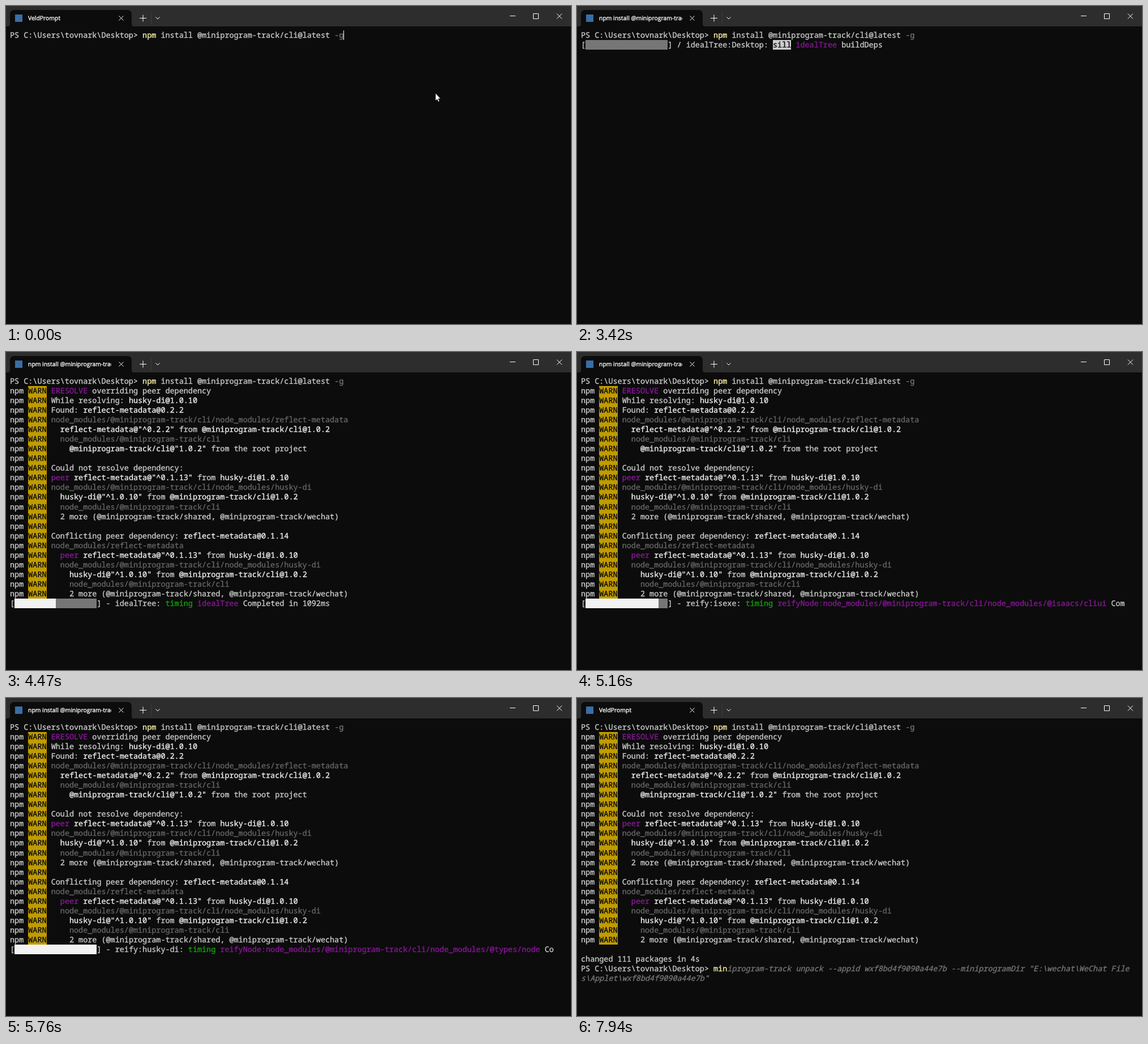
Recreate the animation shown at these times as an HTML page. Size 998 by 561 pixels, loop 7.99 s.

```html
<!DOCTYPE html>
<html lang="en">
<head>
<meta charset="utf-8">
<title>Terminal</title>
<style>
html, body { margin: 0; width: 100%; height: 100%; overflow: hidden; background: #0c0c0c; }
svg, #title, .row, #caret { position: absolute; }
svg { left: 0; top: 0; }
#title, .row { white-space: pre; text-rendering: geometricPrecision; -webkit-text-stroke: .35px; }
#title {
  left: 39px; top: 14px; width: 147px; overflow: hidden; color: #fff;
  font: 500 10.4px/16px "Open Sans", sans-serif;
}
.row {
  left: 7px; color: #ccc;
  font: 500 13.46px/16px "Noto Sans Mono", monospace;
  font-variant-ligatures: none;
}
#caret { width: 1px; height: 17px; background: #fff; }
.y { color: #f9f1a5; }
.h { color: #f2f2f2; }
.p { color: #881798; }
.g { color: #13a10e; }
.d { color: #666; }
.o { color: #767676; }
.t { color: #767676; font-style: italic; }
.w, .i, .f, .e { display: inline-block; height: 17.04px; vertical-align: top; color: #0c0c0c; }
.w { background: #c19c00; }
.i { background: #ccc; }
.f { background: #f2f2f2; }
.e { background: #767676; }
</style>
</head>
<body>
<svg width="998" height="561" fill="none" stroke="#fff">
  <g stroke="none">
    <path fill="#2d2d2d" d="M0 0H998V36H0z"/>
    <path fill="#0c0c0c" d="M3 36a4 4 0 0 0 4-4V14a7 7 0 0 1 7-7H215a7 7 0 0 1 7 7V32a4 4 0 0 0 4 4z"/>
    <path fill="#3a6ea5" d="M16 15h13v13H16z"/>
  </g>
  <path stroke="#3b3b3b" d="M256.5 11V32"/>
  <path d="M199.5 17.5l8 8m0-8l-8 8M236 21.5h12m-6-6v12M264.5 19.5l3.5 3.5 3.5-3.5"/>
  <path d="M890 17.5h10M931.5 13.5h9v9h-9zM973 13.5l9 9m0-9l-9 9"/>
  <path id="mouse" fill="#fff" stroke="#000" stroke-width=".8" d="M758.5 153.5v14l3-2.800 2.200 4.600 2.200-1-2.200-4.500h4.200z"/>
</svg>
<div id="title"></div>
<div id="screen"></div>
<div id="caret"></div>
<script>
const LOOP = 7990, COL = 8.07, ROW = 17.04, LEFT = 7, TOP = 43, COLS = 119;
const el = id => document.getElementById(id);

// Coloured runs are written as `xtext`, where x is a style class.
const paint = s => s.replace(/`(\w)([^`]*)`/g, '<span class="$1">$2</span>');

const prompt = 'PS C:\\Users\\tovnark\\Desktop> ';
const command = prompt + '`ynpm` install @miniprogram-track/cli@latest `o-g`';
const next = 'miniprogram-track unpack --appid wxf8bd4f9090a44e7b --miniprogramDir '
  + '"E:\\wechat\\WeChat Files\\Applet\\wxf8bd4f9090a44e7b"';
const WRAP = 91;

const cli = 'node_modules/@miniprogram-track/cli';
const inner = cli + '/node_modules/';
const warnings = [
  '`pERESOLVE` overriding peer dependency',
  'While resolving: `hhusky-di@1.0.10`',
  'Found: `hreflect-metadata@0.2.2`',
  '`d' + inner + 'reflect-metadata`',
  '  `hreflect-metadata@"^0.2.2"` from `h@miniprogram-track/cli@1.0.2`',
  '  `d' + cli + '`',
  '    `h@miniprogram-track/cli@"1.0.2"` from the root project',
  '',
  'Could not resolve dependency:',
  '`ppeer` `hreflect-metadata@"^0.1.13"` from `hhusky-di@1.0.10`',
  '`d' + inner + 'husky-di`',
  '  `hhusky-di@"^1.0.10"` from `h@miniprogram-track/cli@1.0.2`',
  '  `d' + cli + '`',
  '  2 more (@miniprogram-track/shared, @miniprogram-track/wechat)',
  '',
  'Conflicting peer dependency: `hreflect-metadata@0.1.14`',
  '`dnode_modules/reflect-metadata`',
  '  `ppeer` `hreflect-metadata@"^0.1.13"` from `hhusky-di@1.0.10`',
  '  `d' + inner + 'husky-di`',
  '    `hhusky-di@"^1.0.10"` from `h@miniprogram-track/cli@1.0.2`',
  '    `d' + cli + '`',
  '    2 more (@miniprogram-track/shared, @miniprogram-track/wechat)'
].map(s => 'npm `wWARN` ' + s);

function progress(fill, spin, scope, name, message = 'Completed in 25ms', level = 'gtiming') {
  const used = 23 + scope.length + 2 + level.length + name.length;
  return '[`f' + ' '.repeat(fill) + '``e' + ' '.repeat(18 - fill) + '`] ' + spin + ' ' + scope
    + ': `' + level + '` `p' + name + '`' + (' ' + message).slice(0, COLS - used);
}
const ideal = (fill, spin, pkg) => progress(fill, spin, 'idealTree:' + pkg, 'idealTree:' + inner + pkg);
const reify = (fill, spin, scope, pkg) => progress(fill, spin, 'reify:' + scope, 'reifyNode:' + inner + pkg);

// Each list holds [start time, value].
const bars = [
  [3420, progress(0, '/', 'idealTree:Desktop', 'idealTree', 'buildDeps', 'isill')],
  [3720, progress(2, '-', 'idealTree:cli', 'idealTree:' + cli)],
  [3800, ideal(3, '\\', 'chalk')],
  [3870, ideal(4, '|', 'tslib')],
  [4040, ideal(5, '/', 'clime')],
  [4170, ideal(5, '-', 'husky-di')],
  [4320, ideal(7, '\\', 'glob')],
  [4400, ideal(8, '|', 'rimraf')],
  [4470, progress(9, '-', 'idealTree', 'idealTree', 'Completed in 1092ms')],
  [4530, progress(9, '\\', 'reify', 'reify:loadTrees', 'Completed in 1094ms')],
  [4640, reify(9, '|', 'tslib', 'tslib')],
  [4990, reify(12, '/', 'chalk', 'chalk')],
  [5070, reify(14, '|', 'glob', 'minimatch')],
  [5160, reify(16, '-', 'isexe', '@isaacs/cliui')],
  [5230, reify(16, '\\', 'isexe', 'isexe')],
  [5300, reify(16, '|', 'clime', 'clime')],
  [5370, reify(17, '/', 'clime', 'rimraf')],
  [5440, reify(17, '-', 'glob', 'glob')],
  [5510, reify(17, '\\', 'husky-di', 'tslib')],
  [5590, reify(18, '|', 'husky-di', 'husky-di')],
  [5760, reify(18, '-', 'husky-di', '@types/node')],
  [6200, '']
];
const titles = [
  [0, 'VeldPrompt'], [1250, 'npm'], [1780, 'npm prefix'], [2080, 'npm'],
  [2680, 'npm install @miniprogram-track/cli@latest -g'], [6270, 'VeldPrompt']
];
const carets = [
  [0, [73, 0]], [420, null], [950, [73, 0]], [1100, [0, 1]], [1780, null], [2280, [0, 1]],
  [2830, null], [6200, [0, 25]], [6340, [29, 25]], [6720, null], [6890, [30, 25]],
  [7090, [31, 25]], [7250, [32, 25]], [7940, null]
];
const typed = [[0, 0], [6890, 1], [7090, 2], [7250, 3]];

const at = (list, t) => (list.filter(step => step[0] <= t).pop() || [0, ''])[1];

function rowsAt(t) {
  const rows = [command];
  if (t >= 4170) rows.push(...warnings);
  rows.push(at(bars, t));
  if (t >= 6200) rows.push('changed 111 packages in 4s');
  if (t >= 6340) {
    const n = at(typed, t), hint = t >= 6960;
    rows.push(prompt + '`y' + next.slice(0, n) + '`' + (hint ? '`t' + next.slice(n, WRAP) + '`' : ''));
    if (hint) rows.push('`t' + next.slice(WRAP) + '`');
  }
  return rows;
}

const start = performance.now();
let shown;

function frame() {
  const t = (performance.now() - start) % LOOP;
  const html = rowsAt(t).map((s, i) =>
    `<div class="row" style="top:${TOP + i * ROW}px">${paint(s)}</div>`).join('');
  if (html !== shown) el('screen').innerHTML = shown = html;
  el('title').textContent = at(titles, t);
  el('mouse').style.display = t < 1030 ? '' : 'none';
  const caret = at(carets, t), style = el('caret').style;
  style.display = caret ? '' : 'none';
  if (caret) {
    style.left = Math.round(LEFT + caret[0] * COL) + 'px';
    style.top = Math.round(TOP + caret[1] * ROW) + 'px';
  }
  requestAnimationFrame(frame);
}
frame();
</script>
</body>
</html>
```
